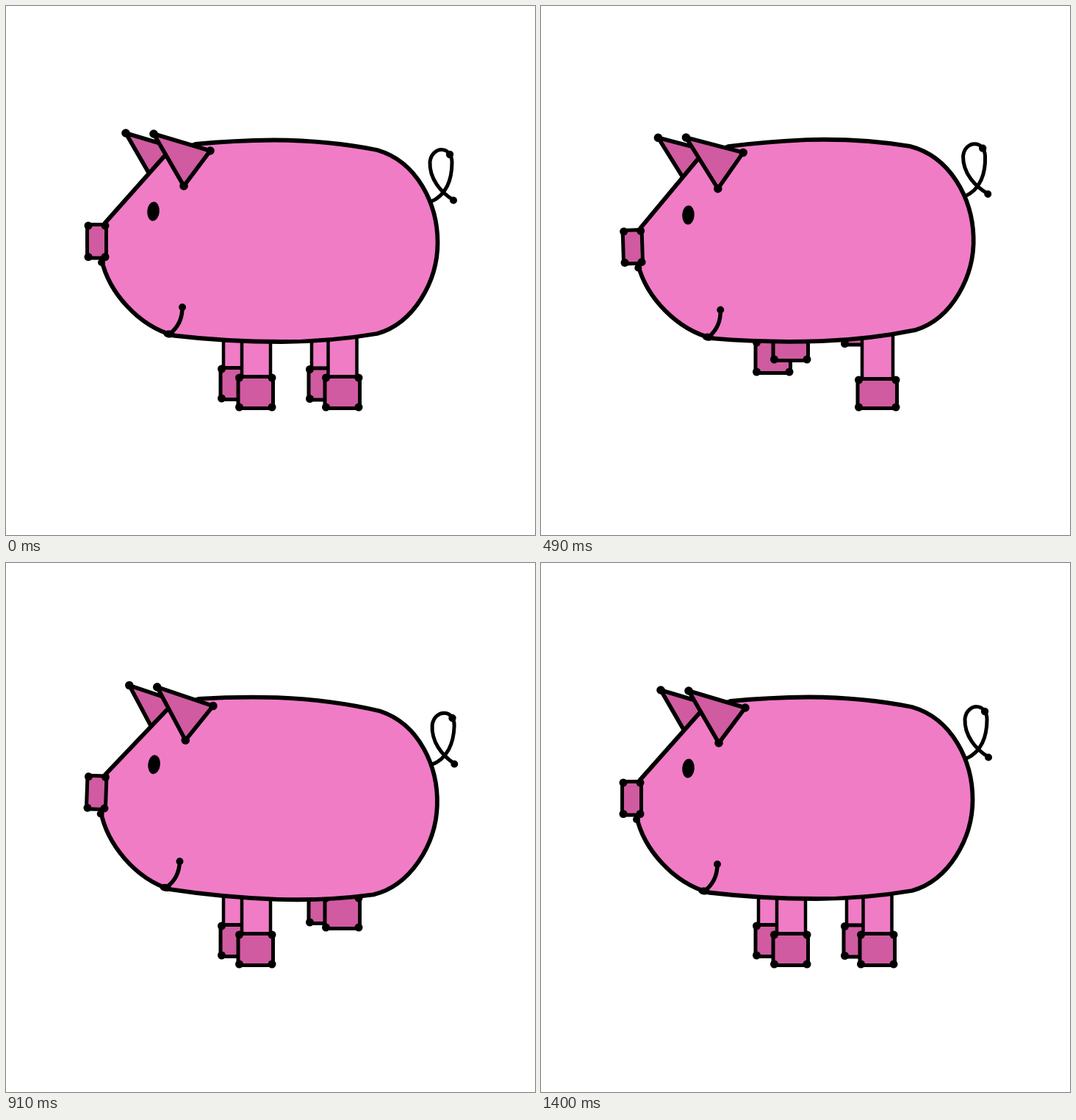
These frames come from a looping animation (720x720 px, 1540 ms). An HTML page with a canvas:

```html
<!DOCTYPE html>
<html lang="en">
<head>
<meta charset="utf-8">
<title>Rocking pig</title>
<style>
  html, body { margin: 0; width: 100%; height: 100%; overflow: hidden; background: #fff; }
  canvas { display: block; width: 720px; height: 720px; }
</style>
</head>
<body>
<canvas id="stage" width="720" height="720"></canvas>
<script>
const ctx = document.getElementById('stage').getContext('2d');
const PINK = '#f07cc6', DARK = '#d05ba1', INK = '#000';
const LOOP = 1540, TICK = 70, LAST_TICK = 20;
const PIVOT = { x: 350, y: 320 };

// Keys are [tick, value]; negative leg lift squashes the foot.
const tilt = [[0, 0], [2, 3.2], [5, -3.4], [6, -3], [7, -1.9], [9, 1],
  [11, 3.5], [13, 2], [15, 1.2], [18, 3.2], [20, 0]];
const shift = [[0, 0], [2, -2], [5, -0.5], [7, 1.2], [11, -0.3], [15, -0.6], [18, -2], [20, 0]];

const legs = [
  { x: 292, foot: 492.5, leg: 296, lift: [[5, 0], [7, 36], [8, 32], [10, 0]] },
  { x: 412, foot: 493, leg: 416, lift: [[2, 0], [5, 52], [7, 75], [9, 82], [11, 73], [15, 18], [16, 0]] },
  { x: 316, foot: 504.5, leg: 321, lift: [[5, 0], [7, 65], [8, 65], [11, 30], [13, 0]] },
  { x: 434, foot: 504.5, leg: 438.5, lift: [[2, 0], [5, 100], [7, -3], [8, 0], [9, 0], [11, 28], [13, 50], [15, 32], [17, 0]] }
];

function valueAt(keys, tick) {
  if (tick <= keys[0][0]) return keys[0][1];
  for (let i = 1; i < keys.length; i++) {
    const [t0, v0] = keys[i - 1], [t1, v1] = keys[i];
    if (tick <= t1) return v0 + (v1 - v0) * (tick - t0) / (t1 - t0);
  }
  return keys[keys.length - 1][1];
}

function shape(path, fill, width) {
  const p = new Path2D(path);
  if (fill) {
    ctx.fillStyle = fill;
    ctx.fill(p);
  }
  ctx.lineWidth = width;
  ctx.stroke(p);
}

function blob(x, y, rx, ry = rx, angle = 0) {
  ctx.fillStyle = INK;
  ctx.beginPath();
  ctx.ellipse(x, y, rx, ry, angle, 0, Math.PI * 2);
  ctx.fill();
}

function block(x, y, w, h) {
  shape(`M${x},${y}h${w}v${h}h${-w}z`, DARK, 5);
  for (const bx of [x + 1.5, x + w - 1.5])
    for (const by of [y + 1.5, y + h - 1.5]) blob(bx, by, 5.5);
}

function ear(x, y) {
  shape(`M${x},${y}l77,23l-36,48z`, DARK, 5.5);
  blob(x, y, 5.8);
  blob(x + 77, y + 23, 5.8);
  blob(x + 41, y + 71, 5.8);
}

function drawLeg({ x, foot, leg, lift }, tick) {
  const up = valueAt(lift, tick);
  const squash = Math.max(0, -up);
  const top = foot - up;
  const spread = squash / 2;
  if (top > 400) shape(`M${leg - spread},380h${39 + squash}V${top}h${-39 - squash}z`, PINK, 4.5);
  block(x - squash, top, 47.5 + squash * 2, 43 - squash);
}

function turned(tick, draw) {
  ctx.save();
  ctx.translate(PIVOT.x + valueAt(shift, tick), PIVOT.y);
  ctx.rotate(valueAt(tilt, tick) * Math.PI / 180);
  ctx.translate(-PIVOT.x, -PIVOT.y);
  draw();
  ctx.restore();
}

function drawBehind() {
  shape('M577,267C600,258 607,235 607,213C607,190 580,190 577,212C576,235 592,254 609,264', null, 5);
  blob(604, 202, 5.2);
  blob(609, 264.5, 5);
  ear(163, 173);
}

function drawFront() {
  shape('M135,295L215,205L258,188Q310,183 365,182.5Q440,183 505,196' +
    'C560,212 587.5,270 587.5,322C587.5,375 555,432 505,446' +
    'Q440,457 375,457Q300,457 228,448.5C180,435 140,390 130,345', PINK, 5.8);
  blob(130, 349, 5);
  ear(201, 174);
  block(110.5, 297.5, 26, 45.5);
  blob(200.5, 279.5, 8.3, 13, 0.08);
  shape('M240,410Q240,433 223,446', null, 5.5);
  blob(240, 410, 5);
  blob(222, 446.5, 8, 5, 0.15);
}

function render(time) {
  const tick = Math.min(LAST_TICK, Math.floor(time % LOOP / TICK));
  ctx.fillStyle = '#fff';
  ctx.fillRect(0, 0, 720, 720);
  ctx.strokeStyle = INK;
  ctx.lineJoin = ctx.lineCap = 'round';
  turned(tick, drawBehind);
  legs.forEach(leg => drawLeg(leg, tick));
  turned(tick, drawFront);
}

const start = performance.now();
function loop() {
  render(performance.now() - start);
  requestAnimationFrame(loop);
}
loop();
</script>
</body>
</html>
```
